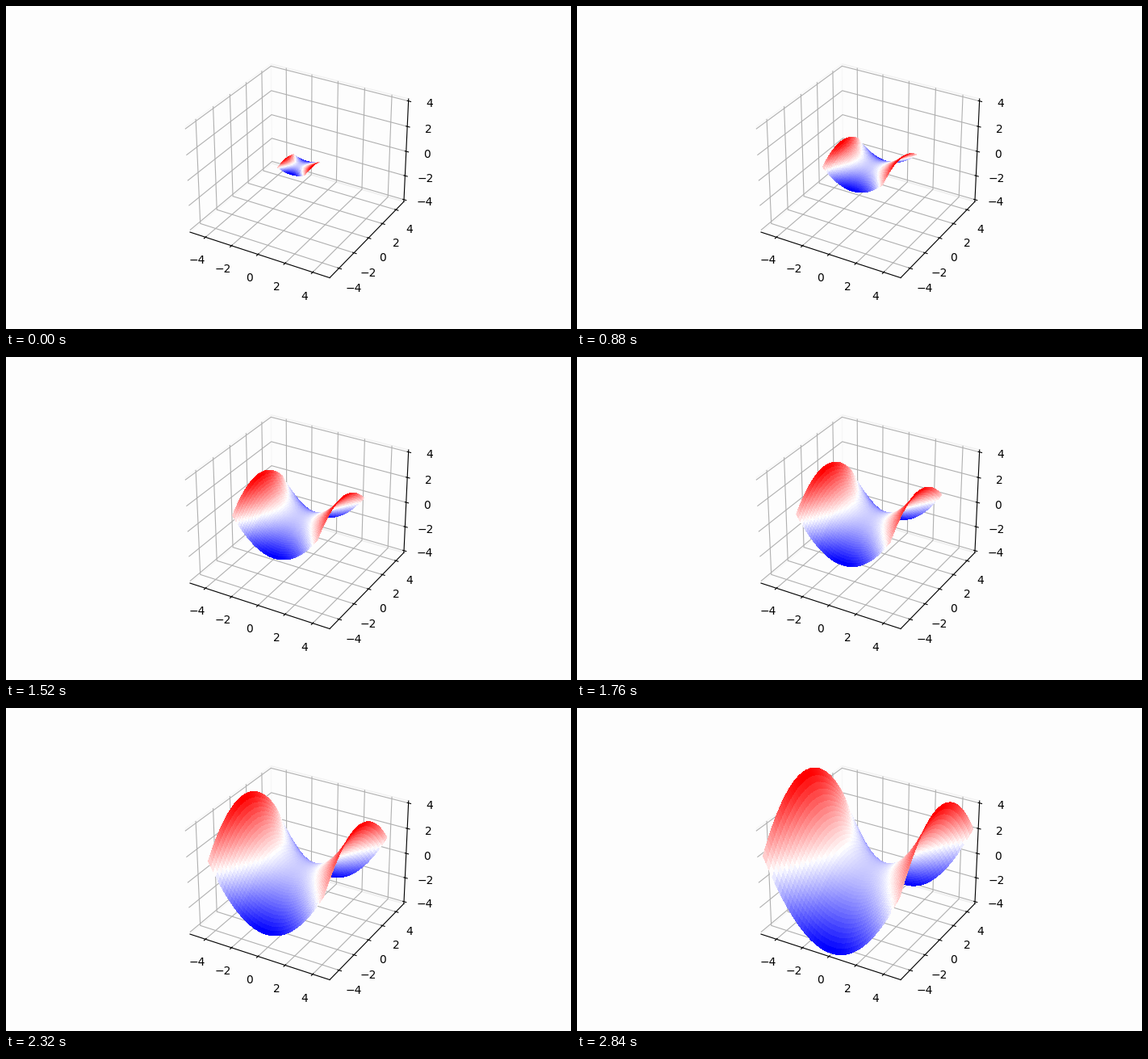
Write a matplotlib script that moves like this. It is 700 px wide and 400 px high and loops after 2880 ms.

```python
import numpy as np
import matplotlib.pyplot as plt
from matplotlib.animation import FuncAnimation

FRAMES = 72
INTERVAL = 40
POINTS = 50
PAPER = "#fdfdfd"
MARGIN = 25 / 24  # room between the outer ticks and the box edges

fig = plt.figure(figsize=(7, 4), dpi=100, facecolor=PAPER)
ax = fig.add_subplot(projection="3d", facecolor=PAPER)
ax.view_init(elev=30, azim=-60)

ax.set_xlim(-5 * MARGIN, 5 * MARGIN)
ax.set_ylim(-5 * MARGIN, 5 * MARGIN)
ax.set_zlim(-4 * MARGIN, 4 * MARGIN)
for axis in (ax.xaxis, ax.yaxis, ax.zaxis):
    axis.set_ticks(range(-4, 5, 2))
    axis.pane.fill = False

surface = None


def draw_saddle(reach):
    side = np.linspace(-reach, reach, POINTS)
    x, y = np.meshgrid(side, side)
    z = x**2 / 4 - y**2 / 6
    return ax.plot_surface(x, y, z, cmap="bwr", rstride=1, cstride=1,
                           linewidth=0, antialiased=False)


def update(frame):
    global surface
    if surface is not None:
        surface.remove()
    surface = draw_saddle(1 + 4 * frame / FRAMES)
    # plotting must not widen the fixed box
    ax.set_xlim(-5 * MARGIN, 5 * MARGIN)
    ax.set_ylim(-5 * MARGIN, 5 * MARGIN)
    ax.set_zlim(-4 * MARGIN, 4 * MARGIN)
    return (surface,)


anim = FuncAnimation(fig, update, frames=FRAMES, interval=INTERVAL,
                     repeat=True, repeat_delay=0, blit=False)

plt.show()
```
